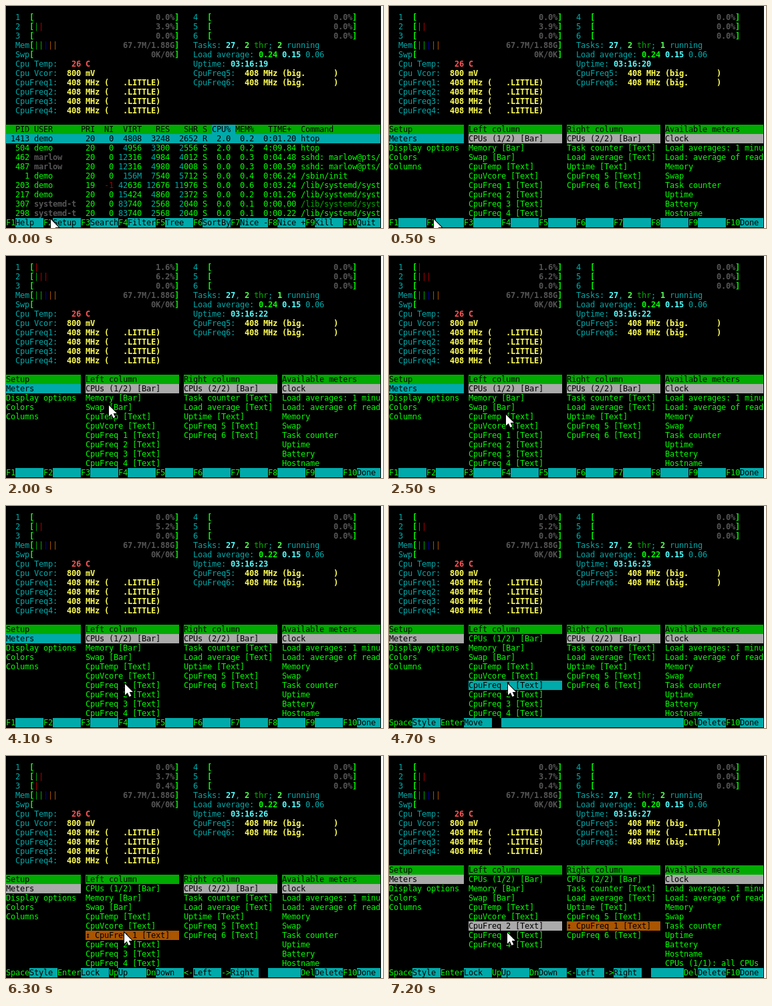
These frames come from a looping animation (564 px wide and 333 px high, 8 s). An HTML page with a canvas:

```html
<!DOCTYPE html>
<html lang="en">
<head>
<meta charset="utf-8">
<title>Process monitor setup</title>
<style>
html, body { margin: 0; width: 100%; height: 100%; overflow: hidden; background: #000; }
canvas { display: block; }
</style>
</head>
<body>
<canvas id="screen" width="564" height="333"></canvas>
<script>
const ctx = document.getElementById('screen').getContext('2d');
const LOOP = 8000, COLS = 80, CELL_W = 7, CELL_H = 14, TOP = 10;

// Style: [text colour, background, bold]
const STYLE = {
  text: ['#0f0'], strong: ['#0f0', , true], dim: ['#555', , true],
  cyan: ['#0aa'], green: ['#0a0'], red: ['#a00'], blue: ['#00a'], brown: ['#a50'],
  hiCyan: ['#5ff', , true], hiGreen: ['#5f5', , true], hiRed: ['#f55', , true], hiYellow: ['#ff5', , true],
  head: ['#000', '#0a0'], focus: ['#000', '#0aa'], idle: ['#000', '#aaa'], moving: ['#000', '#a50']
};

// Writes alternating style/text pairs from a cell; returns the next column.
function put(row, col, ...parts) {
  const y = TOP + row * CELL_H;
  for (let i = 0; i < parts.length; i += 2) {
    const [color, back, bold] = STYLE[parts[i]];
    const text = parts[i + 1].slice(0, COLS - col);
    if (back) {
      ctx.fillStyle = back;
      ctx.fillRect(col * CELL_W, y, text.length * CELL_W, CELL_H);
    }
    ctx.fillStyle = color;
    ctx.font = (bold ? 'bold ' : '') + '12px "DejaVu Sans Mono", monospace';
    for (const ch of text) {
      if (ch !== ' ') ctx.fillText(ch, col * CELL_W, y + 11);
      col++;
    }
  }
  return col;
}

const cpu = (load, ...bars) => ({ load, bars });
const SNAPSHOTS = [
  { at: 0, sec: 19, avg: '0.24', running: 2, cpus: { 2: cpu('3.9', 'green', 'red') } },
  { at: 500, sec: 20, avg: '0.24', running: 1, cpus: { 2: cpu('3.9', 'green', 'red') } },
  { at: 2000, sec: 22, avg: '0.24', running: 1, cpus: { 1: cpu('1.6', 'red'), 2: cpu('6.2', 'green', 'red', 'red') } },
  { at: 3600, sec: 23, avg: '0.22', running: 2, cpus: { 2: cpu('5.2', 'green', 'red') } },
  { at: 6200, sec: 26, avg: '0.22', running: 2, cpus: { 2: cpu('3.7', 'green', 'red'), 3: cpu('0.4', 'red') } },
  { at: 7200, sec: 27, avg: '0.20', running: 2, cpus: { 2: cpu('3.7', 'green', 'red'), 3: cpu('0.4', 'red') } }
];

function meter(row, col, label, value, bars = []) {
  put(row, col, 'cyan', label.padEnd(3), 'strong', '[');
  bars.forEach((style, i) => put(row, col + 4 + i, style, '|'));
  put(row, col + 34 - value.length, 'dim', value, 'strong', ']');
}

function drawMeters(t, moved) {
  const now = SNAPSHOTS.findLast(s => s.at <= t);
  for (let n = 1; n <= 6; n++) {
    const { load, bars } = now.cpus[n] || cpu('0.0');
    meter((n - 1) % 3, n < 4 ? 2 : 40, ' '.repeat(0) + n, load + '%', bars);
  }
  meter(3, 2, 'Mem', '67.7M/1.88G', ['green', 'green', 'blue', 'brown', 'brown']);
  meter(4, 2, 'Swp', '0K/0K');
  put(5, 2, 'cyan', 'Cpu Temp:   ', 'hiRed', '26 C');
  put(6, 2, 'cyan', 'Cpu Vcor:  ', 'hiYellow', '800 mV');

  put(3, 40, 'cyan', 'Tasks: ', 'hiCyan', '27', 'cyan', ', ', 'hiGreen', '2', 'green', ' thr',
    'cyan', '; ', 'hiGreen', String(now.running), 'cyan', ' running');
  put(4, 40, 'cyan', 'Load average: ', 'strong', now.avg, 'hiCyan', ' 0.15', 'cyan', ' 0.06');
  put(5, 40, 'cyan', 'Uptime: ', 'hiCyan', '03:16:' + now.sec);

  const freq = (row, col, n) => put(row, col, 'cyan', `CpuFreq${n}:  `,
    'hiYellow', n < 5 ? '408 MHz (   .LITTLE)' : '408 MHz (big.      )');
  (moved ? [2, 3, 4] : [1, 2, 3, 4]).forEach((n, i) => freq(7 + i, 2, n));
  (moved ? [5, 1, 6] : [5, 6]).forEach((n, i) => freq(6 + i, 40, n));
}

// pid, user, priority, nice, virt, res, shr, state, cpu, mem, time, command
const PROCESSES = `1413 demo 20 0 4808 3248 2652 R 2.0 0.2 0:01.20 htop
504 demo 20 0 4956 3300 2556 S 2.0 0.2 4:09.84 htop
462 marlow 20 0 12316 4984 4012 S 0.0 0.3 0:04.48 sshd: marlow@pts/
487 marlow 20 0 12316 4980 4008 S 0.0 0.3 0:00.59 sshd: marlow@pts/
1 demo 20 0 156M 7540 5712 S 0.0 0.4 0:06.24 /sbin/init
203 demo 19 -1 42636 12676 11976 S 0.0 0.6 0:03.24 /lib/systemd/syst
217 demo 20 0 15424 4860 2372 S 0.0 0.2 0:01.26 /lib/systemd/syst
307 systemd-t 20 0 83740 2568 2040 S 0.0 0.1 0:00.00 /lib/systemd/syst
298 systemd-t 20 0 83740 2568 2040 S 0.0 0.1 0:00.22 /lib/systemd/syst`
  .split('\n').map(line => line.split(' '));

function drawProcesses() {
  put(12, 0, 'head', '  PID USER      PRI  NI  VIRT   RES   SHR S ', 'focus', 'CPU% ',
    'head', 'MEM%   TIME+  Command'.padEnd(31));
  PROCESSES.forEach(([pid, user, pri, nice, virt, res, shr, state, load, mem, time, ...command], i) => {
    const row = 13 + i, style = name => i ? name : 'focus';
    if (!i) put(row, 0, 'focus', ' '.repeat(COLS));
    const right = (end, text, name = 'text') => put(row, end - text.length, style(name), text);
    const size = (end, text) => {
      const big = text.endsWith('M') ? text.length : text.length - 3;
      put(row, end - text.length, style('cyan'), text.slice(0, big), style('text'), text.slice(big));
    };
    right(5, pid);
    put(row, 6, style(user === 'demo' ? 'text' : 'dim'), user);
    right(19, pri);
    right(23, nice, nice < 0 ? 'red' : 'text');
    size(29, virt);
    size(35, res);
    size(41, shr);
    right(43, state);
    right(48, load);
    right(53, mem);
    right(62, time);
    put(row, 63, style(pid === '307' ? 'green' : 'text'), command.join(' '));
  });
}

const AVAILABLE = ['Clock', 'Load averages: 1 minute', 'Load: average of ready', 'Memory', 'Swap',
  'Task counter', 'Uptime', 'Battery', 'Hostname', 'CPUs (1/1): all CPUs'];
const freqItem = n => `CpuFreq ${n} [Text]`;

function panel(top, col, width, title, items, selected, style) {
  put(top, col, 'head', title.padEnd(width));
  items.slice(0, 21 - top).forEach((item, i) => {
    const on = i === selected;
    const label = on && style === 'moving' ? '↕ ' + item : item;
    put(top + 1 + i, col, on ? style : 'text', on ? label.padEnd(width) : label);
  });
}

function drawSetup(picked, moving, moved) {
  const top = moved ? 11 : 12;
  const left = ['CPUs (1/2) [Bar]', 'Memory [Bar]', 'Swap [Bar]', 'CpuTemp [Text]', 'CpuVcore [Text]',
    ...(moved ? [2, 3, 4] : [1, 2, 3, 4]).map(freqItem)];
  const right = ['CPUs (2/2) [Bar]', 'Task counter [Text]', 'Load average [Text]', 'Uptime [Text]',
    ...(moved ? [5, 1, 6] : [5, 6]).map(freqItem)];
  panel(top, 0, 16, 'Setup', ['Meters', 'Display options', 'Colors', 'Columns'], 0, picked ? 'idle' : 'focus');
  panel(top, 17, 20, 'Left column', left, picked ? 5 : 0,
    moved || !picked ? 'idle' : moving ? 'moving' : 'focus');
  panel(top, 38, 20, 'Right column', right, moved ? 5 : 0, moved ? 'moving' : 'idle');
  panel(top, 59, 21, 'Available meters', AVAILABLE, 0, 'idle');
}

const fKeys = labels => labels.flatMap((label, i) => ['F' + (i + 1), label.padEnd(6)]);
const MAIN_KEYS = fKeys(['Help', 'Setup', 'Search', 'Filter', 'Tree', 'SortBy', 'Nice -', 'Nice +', 'Kill', 'Quit']);
const SETUP_KEYS = fKeys([...Array(9).fill(''), 'Done']);
const END_KEYS = ['Del', 'Delete', 'F10', 'Done  '];
const PICK_KEYS = ['Space', 'Style ', 'Enter', 'Move  ', '  ', ' '.repeat(39), ...END_KEYS];
const MOVE_KEYS = ['Space', 'Style ', 'Enter', 'Lock  ', 'Up', 'Up    ', 'Dn', 'Down  ',
  '<-', 'Left  ', '->', 'Right ', '  ', ' '.repeat(7), ...END_KEYS];

function drawKeys(keys) {
  let col = 0;
  keys.forEach((text, i) => { col = put(22, col, i % 2 ? 'focus' : 'text', text); });
}

// Pointer stops: time, x, y
const POINTER = [[0, 67, 320], [1300, 67, 320], [2000, 154, 224], [2200, 174, 224], [2500, 175, 238],
  [3500, 175, 238], [4100, 178, 267], [5000, 178, 267], [5100, 177, 265], [LOOP, 177, 265]];
const ARROW = new Path2D('M0 0V16.5L3.8 13L6.5 19L9.3 17.8L6.7 12H11.8Z');

function drawPointer(t) {
  const step = Math.floor(t / 100) * 100;
  const i = POINTER.findIndex(p => p[0] > step);
  const [t0, x0, y0] = POINTER[i - 1], [t1, x1, y1] = POINTER[i];
  const k = (step - t0) / (t1 - t0);
  ctx.save();
  ctx.translate(Math.round(x0 + (x1 - x0) * k), Math.round(y0 + (y1 - y0) * k));
  ctx.strokeStyle = '#000';
  ctx.lineWidth = 2;
  ctx.stroke(ARROW);
  ctx.fillStyle = '#fff';
  ctx.fill(ARROW);
  ctx.restore();
}

function draw() {
  const t = performance.now() % LOOP;
  const setup = t >= 500, picked = t >= 4700, moving = t >= 6200, moved = t >= 7200;
  ctx.fillStyle = '#fff';
  ctx.fillRect(0, 0, 564, 333);
  ctx.fillStyle = '#000';
  ctx.fillRect(0, 0, 561, 333);
  drawMeters(t, moved);
  if (setup) drawSetup(picked, moving, moved);
  else drawProcesses();
  drawKeys(moving ? MOVE_KEYS : picked ? PICK_KEYS : setup ? SETUP_KEYS : MAIN_KEYS);
  drawPointer(t);
  requestAnimationFrame(draw);
}
draw();
</script>
</body>
</html>
```
